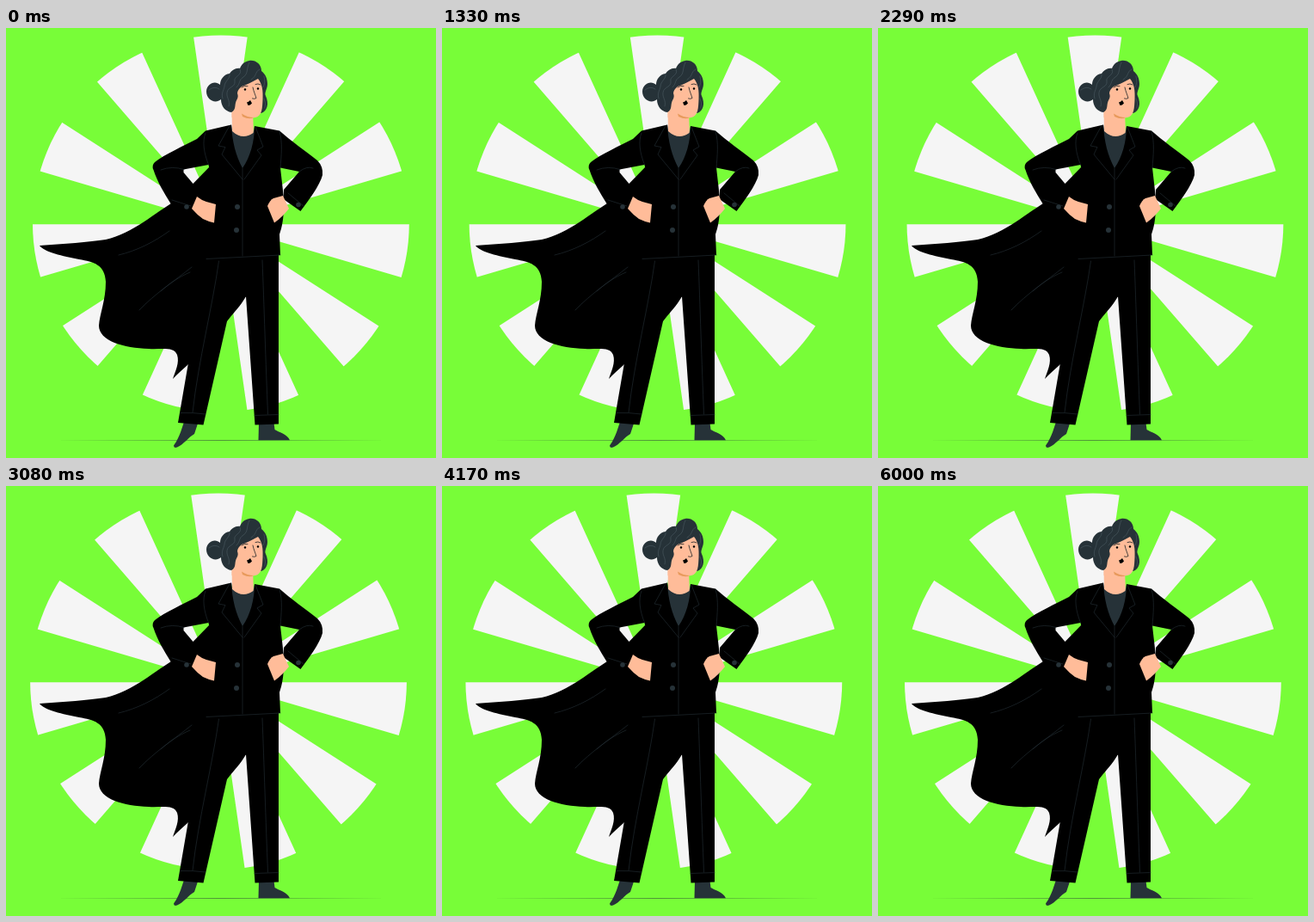
Write an HTML page that moves like this. It is 500 px wide and 500 px high and loops after 6.04 s.

```html
<!DOCTYPE html>
<html lang="en">
<head>
<meta charset="utf-8">
<title>Caped heroine</title>
<style>
  html, body { margin: 0; width: 100%; height: 100%; overflow: hidden; background: #78fd38; }
  svg { display: block; width: 100vw; height: 100vh; }
  .dark { fill: #263238; }
  .skin { fill: #ffbc99; }
  .seam { fill: none; stroke: #263238; stroke-width: .6; stroke-linecap: round; }
  .strand { fill: none; stroke: #52636b; stroke-width: .5; stroke-linecap: round; }
  .ink { fill: none; stroke: #1b2226; stroke-width: .8; stroke-linecap: round; stroke-linejoin: round; }
</style>
</head>
<body>
<svg viewBox="0 0 500 500">
  <defs>
    <clipPath id="rim"><circle cx="249.900" cy="227.400" r="218.900"/></clipPath>
  </defs>
  <rect width="500" height="500" fill="#78fd38"/>
  <g id="wheel"><path id="rays" fill="#f5f5f5" clip-path="url(#rim)"/></g>
  <path class="dark" d="M55 479.200L250 478.900L445 479.200L250 479.500Z"/>

  <!-- shoes -->
  <path class="dark" d="M207 458L223 460L219 472C212 476 207 484 199 487.500Q195 489 195 485.500C199 480 201 475 203 470Z"/>
  <path class="dark" d="M294 459H311.500L312.500 467C317 470 327 472 330 479.300H293.500Z"/>

  <!-- cape -->
  <path d="M39 253C66 251 97 249 116 246C148 239 174 214 197 201L217.500 181L236 162L310 200L279 312C273 323 264 332 256.500 341L211 392C205 397 199 403 194 408C197 399 202 389 199 380C195 370 181 374 166 373C137 372 108 364 108 346C109 332 116 317 116 295C115 275 102 272 85 269C66 265 45 261 39 253Z"/>
  <path class="seam" d="M131 264C152 259 172 249 190 236M155 328C173 309 196 294 216 278M180 306C190 297 202 289 214 284"/>

  <!-- trousers -->
  <path d="M234 262L200 459L229.500 461.500L257 341L279 312L289.500 461.500L317 460.500V260Z"/>
  <path class="seam" d="M203 447.500Q218 447 232 449M247.500 271C240 325 224 385 217 447M289 450.500L317 449.500M298 270C300 320 302 390 304.500 449"/>

  <!-- neck and shirt -->
  <path class="skin" d="M262.500 92L263 123L276 129L288 123L287 98Z"/>
  <path class="dark" d="M262 112L263 120Q275 131 287.500 122L289 114L292 135L275 166L260 140Z"/>

  <!-- jacket -->
  <path d="M262 112.500L232 119.500L222 129C205 138 186 146 173 156Q169 160 171.500 165C176 179 184 192 192 205L212.500 213.500L222 197L217.500 181L206.500 168V164.500L235.500 159L236.500 164L224 197L233 269L319 264L318 240C321 231 323 222 323 205L322 189L319 162.500L341 167L323 188L322.500 199L342.500 213C352 200 365 183 368 171Q369 161 362 154C348 143 331 131 318 119.500L289 114C289 132 284 150 275 163C267 148 263 132 262 112.500Z"/>
  <path class="seam" d="M233 268.500L319 264M275 163V265M260 113.500L247 137L255 138.500L251 147L275 176M290 115L299 138L292 142L297 148L277 176M232 122C228 132 230 145 235.500 159M318 120C322 134 320 148 319 163M180 165Q193 160 207 164.500M193 200L215 207M341 167Q350 160 357 163M328 192L346 207"/>
  <g class="dark">
    <circle cx="269" cy="208" r="3"/><circle cx="268" cy="235" r="3"/>
    <circle cx="210" cy="208" r="2.800"/><circle cx="340" cy="205.500" r="2.800"/>
  </g>

  <!-- hands -->
  <path class="skin" d="M222 196Q227 200 233 202L244 205L242 226.500Q235 225 229 222Q222 217 216 210Z"/>
  <path class="skin" d="M322 195L329 210C324 216 319 222 312 226.500L304 207Q307 200 311 198Z"/>

  <!-- head -->
  <path class="dark" d="M249 66C243 60 233 65 233 74C233 83 243 89 250 83C250 91 255 97 262 98L280 90L297 99C304 96 306 88 302 79C300 75 304 71 304 65C304 58 301 53 297 50C297 42 290 37 283 38C277 39 274 42 272 47C267 46 262 50 260 53C253 54 249 60 249 66Z"/>
  <path class="skin" d="M274 68C280 66 287 62 293 59C298 65 299 73 298.500 83C298 93 298 102 290 104C286 105 280 104 275 101L262.500 104V98C267 95 266 91 267 87C268 83 271 81 269 76Q269 72 274 68Z"/>
  <path d="M274 99.500Q281 104 288 104Q283 107 275 103Z" fill="#e89a5c"/>
  <path class="strand" d="M272 48C276 55 264 56 266 62C267 69 258 68 257 75C256 81 261 84 259 91M260 54C261 59 254 62 254 68C253 73 250 76 252 82M283 40C279 48 282 53 276 57C270 61 273 64 268 69M295 48C289 51 292 56 285 60M236 72Q242 67 248 71M300 56Q302 64 299 69M300 82Q303 88 301 93"/>
  <path class="ink" d="M274 69Q277 66.500 281 67.500M290 65.500Q293 64 296 66M287 69C288 74 290 78 291 81.500Q289 83 286.500 82"/>
  <circle cx="278" cy="71.500" r="1.200"/><circle cx="293" cy="70.500" r="1.200"/>
  <path d="M280 86.500Q282 86 284 84L286 87.500Q284 90 281.500 90Z"/>
</svg>
<script>
const LOOP = 6040, SHAKE = 6000, FRAME = 1000 / 24;
const SWAY = [0, -1, 2, -4, 4, -4, 4, -4, 2, -1, 0];
const HUB = { x: 249.4, y: 228.2 }, REACH = 240, COUNT = 11;
const wheel = document.getElementById('wheel');
const rays = document.getElementById('rays');

const spoke = angle =>
  `L${(HUB.x + REACH * Math.sin(angle)).toFixed(2)} ${(HUB.y - REACH * Math.cos(angle)).toFixed(2)}`;

// Equal wedges and gaps around the hub; the rim clip rounds their ends.
function buildRays() {
  const width = Math.PI / COUNT;
  let path = '';
  for (let i = 0; i < COUNT; i++) {
    const start = (2 * i - 0.5) * width;
    path += `M${HUB.x} ${HUB.y}${spoke(start)}${spoke(start + width)}Z`;
  }
  rays.setAttribute('d', path);
}

// Linear sway between evenly spaced stops, stepped at 24 frames a second.
function swayAt(ms) {
  const time = Math.floor((ms % LOOP + 5) / FRAME) * FRAME;
  const position = Math.min(time / SHAKE, 1) * (SWAY.length - 1);
  const i = Math.min(Math.floor(position), SWAY.length - 2);
  return SWAY[i] + (SWAY[i + 1] - SWAY[i]) * (position - i);
}

const origin = performance.now();
function draw() {
  const ms = Math.max(0, performance.now() - origin);
  wheel.setAttribute('transform', `translate(${swayAt(ms).toFixed(3)} 0)`);
  requestAnimationFrame(draw);
}

buildRays();
draw();
</script>
</body>
</html>
```
